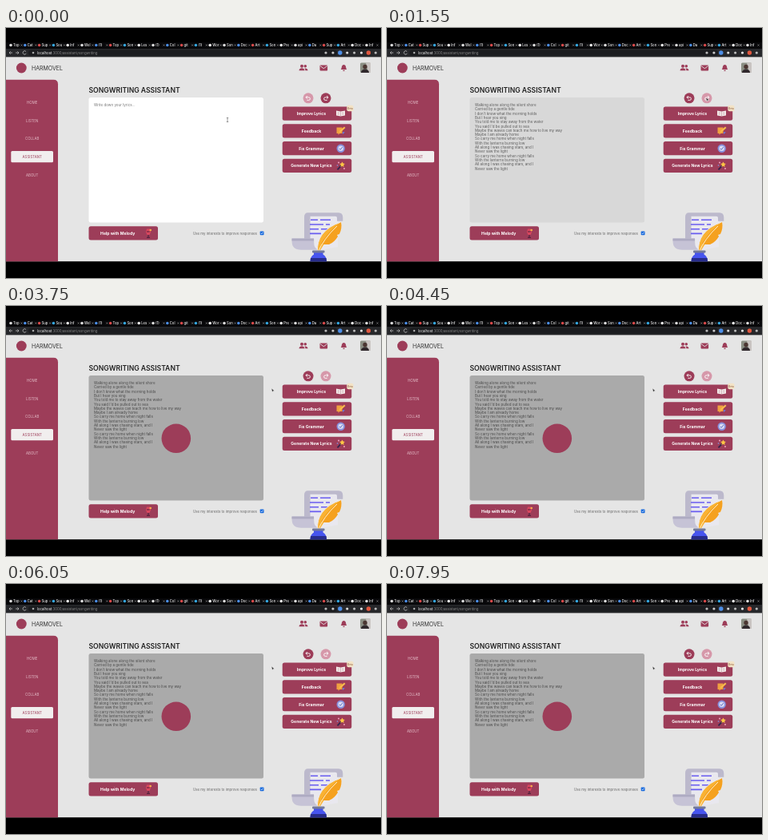
An HTML page that plays this animation: 469x313 px, repeating every 8000 ms.

```html
<!DOCTYPE html>
<html lang="en">
<head>
<meta charset="utf-8">
<title>Songwriting assistant</title>
<style>
  html, body { margin: 0; width: 100%; height: 100%; overflow: hidden; background: #000; }
  svg { display: block; width: 100%; height: 100%; font-family: Inter, sans-serif; }
  .wine { fill: #9d3d59; }
  .button text { fill: #fff; font-weight: 700; text-anchor: middle; }
  .nav { font-size: 4.4px; fill: #e3bdc8; text-anchor: middle; }
  .small { font-size: 4.35px; fill: #666; }
  .lyric { font-size: 4.5px; fill: #5c5c5c; }
</style>
</head>
<body>
<svg id="stage" viewBox="0 0 469 313" preserveAspectRatio="none">
  <rect width="469" height="313"/>
  <g id="browser">
    <rect y="18" width="469" height="8" fill="#08080a"/>
    <rect y="26" width="469" height="10.3" fill="#27282b"/>
    <rect x="28" y="27.5" width="386" height="7" rx="3.5" fill="#1b1c1f"/>
    <g fill="none" stroke="#bbb" stroke-width=".8">
      <path d="M8 31H4l1.7-1.7M4 31l1.7 1.7M12 31h4l-1.7-1.7M16 31l-1.7 1.7"/>
      <path d="M25 29.5a2.2 2.2 0 1 0 .3 2.3"/>
    </g>
    <circle cx="34" cy="31" r="1.3" fill="#aaa"/>
    <text x="39" y="32.6" font-size="4.3" fill="#888"><tspan fill="#fff">localhost</tspan>:3000/assistant/songwriting</text>
  </g>

  <rect y="36.3" width="469" height="255.9" fill="#e5e5e5"/>
  <circle class="wine" cx="19.3" cy="50" r="6.4"/>
  <text x="32" y="52.5" font-size="7" fill="#333">HARMOVEL</text>
  <g class="wine">
    <circle cx="370" cy="47.8" r="2"/><circle cx="374.3" cy="47.8" r="1.8"/>
    <path d="M366.5 53.3c0-4.1 7-4.1 7 0zM374.3 53.3c0-1.3-.4-2.2-1.1-2.7 2.1-.7 4.3.3 4.3 2.7z"/>
    <rect x="392.5" y="46.6" width="9.6" height="6.8" rx="1"/>
    <path d="M392.8 47.4l4.5 3.3 4.5-3.3" fill="none" stroke="#e5e5e5" stroke-width=".9"/>
    <path d="M418.8 52c1.4-1.5.5-6 3.7-6s2.3 4.500 3.700 6zM421.200 52.700h2.600a1.300 1.300 0 0 1-2.600 0z"/>
  </g>
  <g>
    <rect x="443" y="43.5" width="13" height="12.500" rx="1.500" fill="#8b8f84"/>
    <path d="M450 43.500h6V56h-3z" fill="#c9c4c2"/>
    <circle cx="449" cy="48.500" r="2.700" fill="#4b3632"/>
    <path d="M444 56c0-6 10-6 10 0z" fill="#30282c"/>
  </g>

  <path class="wine" d="M0 64.700h59.500q5.500 0 5.500 5.500v222H0z"/>
  <rect x="6.300" y="154" width="52.700" height="14.300" rx="1.500" fill="#f1eeee"/>
  <g id="nav"></g>

  <text x="103.500" y="80.800" font-size="8.650" font-weight="600" fill="#222">SONGWRITING ASSISTANT</text>
  <rect id="editor" x="103.500" y="87" width="218.500" height="156.500" rx="2.500"/>
  <text id="placeholder" class="lyric" x="110" y="98" style="fill:#777">Write down your lyrics...</text>
  <g id="lyrics"></g>
  <g id="loading">
    <rect x="103.500" y="87" width="218.500" height="156.500" rx="2.500" fill-opacity=".21"/>
    <circle class="wine" cx="212.800" cy="165.800" r="18.300"/>
  </g>

  <text class="small" x="234" y="258.500">Use my interests to improve responses</text>
  <rect x="317.700" y="254.400" width="4.800" height="4.800" rx=".8" fill="#1769dc"/>
  <path d="M318.800 256.800l1 1.100 1.700-2.200" fill="none" stroke="#fff" stroke-width=".7"/>

  <g id="undo"><circle cx="378" cy="87.800" r="6.500"/>
    <path d="M376.800 85l-1.800 1.800 1.800 1.800M375 86.800h3.600a1.800 1.800 0 0 1 0 3.600h-2.200" fill="none" stroke="#fff" stroke-width=".9"/></g>
  <g id="redo"><circle cx="400" cy="87.800" r="6.500"/>
    <path d="M401.200 85l1.800 1.800-1.800 1.800M403 86.800h-3.600a1.800 1.800 0 0 0 0 3.600h2.200" fill="none" stroke="#fff" stroke-width=".9"/></g>

  <g id="buttons"></g>
  <g id="book">
    <path d="M413 103.600l5.500.8 5.500-.8v6l-5.500.8-5.500-.8z" fill="#f4eceb"/>
    <path d="M418.500 104.400v6M414.500 106h2.500M414.500 108h2.500M420 106h2.500M420 108h2.500" stroke="#b98b95" stroke-width=".6"/>
  </g>
  <rect x="426.300" y="96.700" width="8.200" height="7.600" rx="2" fill="#f3e3c6"/>
  <text x="430.400" y="101.500" font-size="3" fill="#8a5a3a" text-anchor="middle">Beta</text>
  <g>
    <path d="M413.500 124.500h7v7.500h-3l-2 1.700V132h-2z" fill="#f0a040"/>
    <path d="M416.500 131l1-2.500 5.500-5 1.500 1.500-5.500 5z" fill="#f7bd4b"/>
    <path d="M421 130l3 .5-3 2.500z" fill="#6b78d8"/>
  </g>
  <g>
    <circle cx="418.700" cy="150.700" r="5.200" fill="#8890dc"/>
    <circle cx="418.700" cy="150.700" r="3.300" fill="#d8dcf4"/>
    <path d="M416.800 150.800l1.400 1.500 2.600-3.200" fill="none" stroke="#5560b8" stroke-width=".9"/>
  </g>
  <g>
    <path d="M414.500 177.300l6-6.500" stroke="#33264d" stroke-width="1.800"/>
    <path d="M420.500 167.500l1.100 2.100 2.300.3-1.700 1.700.4 2.300-2.100-1.100-2.100 1.100.4-2.300-1.700-1.700 2.300-.3z" fill="#ffc744"/>
    <g fill="#f2a0bc"><circle cx="416" cy="168.500" r="1"/><circle cx="423" cy="176" r="1"/></g>
    <circle cx="414.500" cy="172" r=".8" fill="#7e9af0"/>
  </g>
  <g>
    <path d="M176 251.500h4l1 4-1.500 3.500h-3l-1.500-3.500z" fill="#d9475f"/>
    <path d="M176 255h3.600M178 259v3M176 262.300h4" stroke="#401b36" stroke-width=".9"/>
    <circle cx="180.700" cy="253" r="1.300" fill="#f5b04a"/>
  </g>

  <g id="scroll">
    <path d="M378 232h37v42l-22 4h-7v-14h-8z" fill="#e9e8ef"/>
    <path d="M377.500 231.300H416q5.300 0 5.300 6v4.500H414v-4q0-2-2-2h-31.500v28H373v-27q0-5.500 4.500-5.500z" fill="#bcb9cc"/>
    <path d="M357.500 263.500h27.500v5q0 6.500 5 9.300h-21q-11.500 0-11.500-11z" fill="#c6c3d6"/>
    <path d="M357.500 263.500h27.500v3h-27.500z" fill="#aeabc2"/>
    <path d="M381 240.300h9M393 240.300h13M380 246h17M400 246h5M380 251.700h11M394 251.700h8M380 257.400h14" stroke="#695cf0" stroke-width="1.600"/>
    <path d="M389.500 279q-.5-11 5.500-20 8-11 24-16 1.500 8-2 15l-3 1 1 2q-4 7-11 10h-6l-5 8z" fill="#f9b233" stroke="#eeedf2" stroke-width=".9"/>
    <path d="M394 270q8-15 25-27 1.500 8-2 15l-3 1 1 2q-4 7-11 10h-8z" fill="#f5a11f"/>
    <path d="M390 281q7-17 24-33" fill="none" stroke="#fff0cc" stroke-width="1"/>
    <path d="M385 281h11.500v2.500q4.500 2.500 4.500 8.700h-20.500q0-6.200 4.500-8.700z" fill="#4654ee"/>
    <path d="M381 288h19.500l.5 4.200h-20.500z" fill="#282d8c"/>
    <rect x="383" y="278.500" width="15.500" height="3" rx="1" fill="#73799a"/>
  </g>

  <path id="caret" d="M-1.200-2.500h2.400M0-2.500v5M-1.200 2.500h2.400" stroke="#555" stroke-width=".6"/>
  <path id="pointer" d="M-1-2l3.600 3.300-1.700.1-.8 1.700z" stroke="#fff" stroke-width=".4"/>
</svg>
<script>
const LOOP = 8000, REDO_AT = 950, SUBMIT_AT = 3450;
const $ = id => document.getElementById(id);
const add = (id, markup) => $(id).insertAdjacentHTML('beforeend', markup);

const tabNames = ['Top', 'Cat', 'Sup', 'Sou', 'Inf', 'Wel', '(1)', 'Top', 'Son', 'Les', '(1)', 'Col',
  'git', '(1)', 'Wor', 'Son', 'Doc', 'Art', 'Son', 'Pre', 'api', 'Da', 'Sup', 'Art', 'Doc', 'Inf'];
const tabColors = ['#ddd', '#d84a4a', '#eee', '#4c8fe8', '#35a7df'];
tabNames.forEach((name, i) => {
  const x = 6 + i * 17.8;
  add('browser', `<circle cx="${x}" cy="21.5" r="1.8" fill="${tabColors[i * 3 % 5]}"/>
    <text x="${x + 3}" y="23" font-size="4.2" font-weight="500" fill="#eee">${name}</text>
    <path d="M${x + 12.5} 20.5l2 2m0-2l-2 2" stroke="#bbb" stroke-width=".5"/>`);
});
['#bbb', '#ccc', '#4c8fe8', '#ddd', '#bbb', '#eee', '#e0573f', '#bbb'].forEach((color, i) =>
  add('browser', `<circle cx="${400 + i * 8.9}" cy="31" r="${i === 2 || i === 6 ? 2.7 : 1.6}" fill="${color}"/>`));

['HOME', 'LISTEN', 'COLLAB', 'ASSISTANT', 'ABOUT'].forEach((label, i) =>
  add('nav', `<text class="nav" x="32.7" y="${94.8 + i * 22.7}" ${i === 3 ? 'style="fill:#9d3d59"' : ''}>${label}</text>`));

function addButton(label, x, y, textX) {
  add('buttons', `<g class="button"><rect class="wine" x="${x}" y="${y}" width="86.5" height="17.3" rx="2.5"/>
    <text x="${textX}" y="${y + 10.5}" font-size="5.1">${label}</text></g>`);
}
['Improve Lyrics', 'Feedback', 'Fix Grammar', 'Generate New Lyrics'].forEach((label, i) =>
  addButton(label, 345.7, 98.4 + i * 21.8, 382));
addButton('Help with Melody', 103.5, 248.3, 139.7);
const improveButton = document.querySelector('.button rect');

const verse = [
  'Walking alone along the silent shore',
  'Carried by a gentle tide',
  "I don't know what the morning holds",
  'But I hear you sing',
  'You told me to stay away from the water',
  "You said I'd be pulled out to sea",
  'Maybe the waves can teach me how to live my way',
  'Maybe I am already home'
];
const chorus = [
  'So carry me home when night falls',
  'With the lanterns burning low',
  'All along I was chasing stars, and I',
  'Never saw the light'
];
[...verse, ...chorus, ...chorus].forEach((line, i) =>
  add('lyrics', `<text class="lyric" x="110" y="${98 + i * 5.3}">${line}</text>`));

// Each stop is time, x, y.
const cursorPath = [[0, 277, 115], [250, 277, 115], [850, 400, 89], [1900, 400, 89],
  [2600, 354, 104], [3450, 354, 104], [3700, 333, 105], [LOOP, 333, 105]];

function cursorAt(time) {
  const next = cursorPath.findIndex(stop => stop[0] > time);
  const [t0, x0, y0] = cursorPath[next - 1], [t1, x1, y1] = cursorPath[next];
  const p = (time - t0) / (t1 - t0), ease = p * p * (3 - 2 * p);
  return [x0 + (x1 - x0) * ease, y0 + (y1 - y0) * ease];
}

const show = (id, visible) => $(id).setAttribute('visibility', visible ? 'visible' : 'hidden');
const enable = (id, on) => $(id).setAttribute('fill', on ? '#9d3d59' : '#d698aa');

function draw() {
  const time = performance.now() % LOOP;
  const filled = time >= REDO_AT;
  const [x, y] = cursorAt(time);
  const inEditor = x < 322;
  const onImprove = x > 346 && y > 98;

  $('editor').setAttribute('fill', filled ? '#d8d8d8' : '#fff');
  show('placeholder', !filled);
  show('lyrics', filled);
  show('loading', time >= SUBMIT_AT);
  enable('undo', filled);
  enable('redo', !filled);
  improveButton.style.fill = onImprove ? '#b2506c' : '';
  $('book').setAttribute('transform', onImprove ? 'rotate(8 418.5 107)' : '');
  $('pointer').setAttribute('fill', onImprove ? '#fff' : '#222');
  for (const id of ['caret', 'pointer']) $(id).setAttribute('transform', `translate(${x} ${y})`);
  show('caret', inEditor);
  show('pointer', !inEditor);
  requestAnimationFrame(draw);
}
draw();
</script>
</body>
</html>
```
